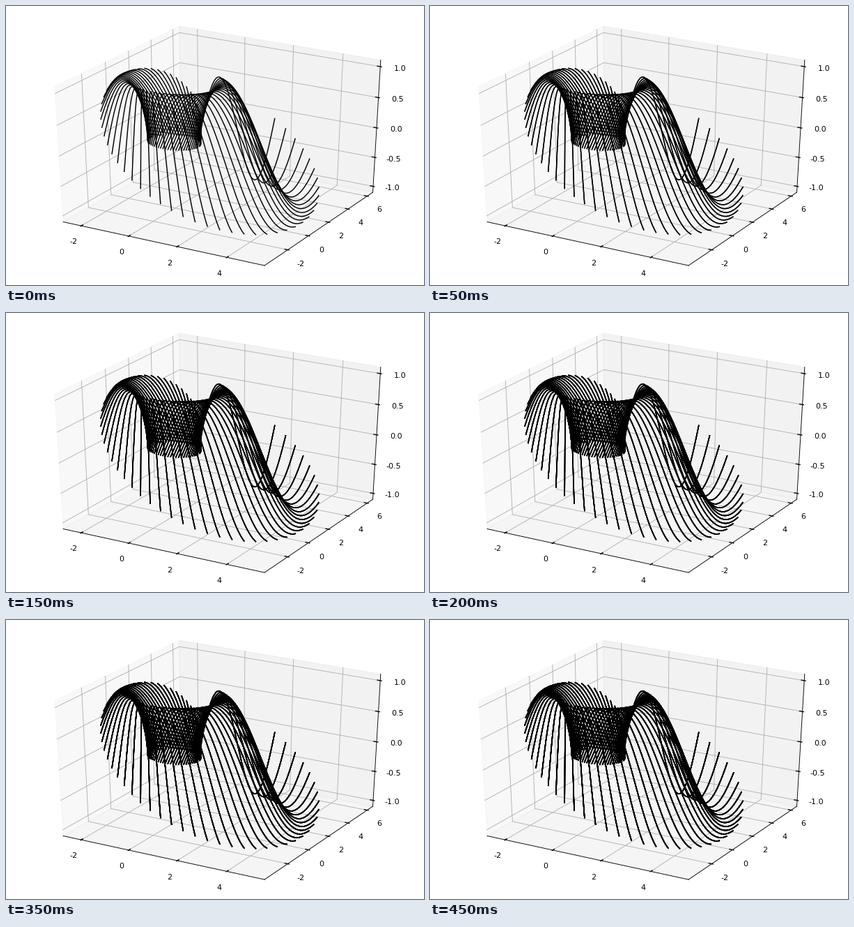
A matplotlib script for the animation above (550 ms loop, 600 by 400 pixels).

```python
import numpy as np
import matplotlib.pyplot as plt
from matplotlib.animation import FuncAnimation
from matplotlib.collections import LineCollection
from matplotlib.patches import Polygon

W, H, DPI = 600, 400, 80
FRAMES, INTERVAL = 11, 50
DIST = 10
EDGE = 0.5115       # half size of the box, in view units
FILL = 0.9265       # share of a unit cube taken by the data
LABEL_GAP = 0.064
TICK_OUT, TICK_IN = 0.0083, 0.0167
CENTER = np.array([307.8, 194.6])
ZOOM = np.array([3261, -2162])

elev, azim = np.radians(30), np.radians(-60)
TOWARD = np.array([np.cos(elev) * np.cos(azim),
                   np.cos(elev) * np.sin(azim),
                   np.sin(elev)])
RIGHT = np.array([-np.sin(azim), np.cos(azim), 0])
UP = np.cross(TOWARD, RIGHT)


def project(points):
    """Perspective view of box points, as stage pixels."""
    p = np.atleast_2d(points)
    flat = np.column_stack([p @ RIGHT, p @ UP])
    return CENTER + ZOOM * flat / (DIST - p @ TOWARD)[:, None]


def tangent(a, n=70):
    """Line along the tangent of the unit circle at angle a, lifted by a sine."""
    t = np.linspace(0, a, n)
    return np.column_stack([np.cos(a) - t * np.sin(a),
                            np.sin(a) + t * np.cos(a),
                            np.sin(t)])


lines = [tangent(a) for a in np.arange(63) * 0.1]
cloud = np.vstack(lines)
low, high = cloud.min(axis=0), cloud.max(axis=0)
mid, scale = (low + high) / 2, FILL / (high - low)
curves = [project((line - mid) * scale) for line in lines]

fig = plt.figure(figsize=(W / DPI, H / DPI), dpi=DPI, facecolor="white")
ax = fig.add_axes([0, 0, 1, 1])
ax.set_xlim(0, W)
ax.set_ylim(H, 0)
ax.axis("off")

E = EDGE


def stroke(points, **style):
    ax.plot(*project(points).T, **style)


def pane(corners, grey):
    tone = (grey, grey, grey, 0.5)
    ax.add_patch(Polygon(project(corners), facecolor=tone, edgecolor=tone,
                         linewidth=1, zorder=0))


pane([(-E, -E, -E), (-E, E, -E), (-E, E, E), (-E, -E, E)], 0.95)
pane([(-E, E, -E), (E, E, -E), (E, E, E), (-E, E, E)], 0.90)
pane([(-E, -E, -E), (E, -E, -E), (E, E, -E), (-E, E, -E)], 0.925)


def draw_axis(index, base, tick_dir, grid_path, ticks, fmt):
    """Axis line, grid, ticks and labels; base is the edge the axis runs on."""
    base = np.array(base, float)
    side = np.sign(base)
    ends = np.array([base, base])
    ends[:, index] = -E, E
    stroke(ends, color="black", lw=0.8, zorder=2)
    for value in ticks:
        at = (value - mid[index]) * scale[index]
        path = np.array(grid_path, float)
        path[:, index] = at
        stroke(path, color="#b0b0b0", lw=0.8, zorder=1)

        mark = np.array([base, base])
        mark[:, index] = at
        mark[:, tick_dir] += side[tick_dir] * np.array([TICK_OUT, -TICK_IN])
        stroke(mark, color="black", lw=1.2, zorder=3, solid_capstyle="butt")

        spot = base + side * LABEL_GAP
        spot[index] = at
        ax.text(*project(spot)[0], fmt % value, ha="center", va="top",
                family="DejaVu Sans", size=10, color="black")


draw_axis(0, (0, -E, -E), 1, [(0, -E, -E), (0, E, -E), (0, E, E)],
          range(-2, 5, 2), "%d")
draw_axis(1, (E, 0, -E), 0, [(E, 0, -E), (-E, 0, -E), (-E, 0, E)],
          range(-2, 7, 2), "%d")
draw_axis(2, (E, E, 0), 0, [(E, E, 0), (-E, E, 0), (-E, -E, 0)],
          np.arange(-1, 1.1, 0.5), "%.1f")

wire = LineCollection([], colors="black", linewidths=1.3, zorder=4)
ax.add_collection(wire, autolim=False)


def update(frame):
    # repainting the set hardens the soft edges; later on only every other step
    coats = 1 + min(frame, 5) + max(frame - 5, 0) // 2
    wire.set_segments(curves * coats)
    return [wire]


def reset():
    return update(0)


anim = FuncAnimation(fig, update, frames=FRAMES, init_func=reset,
                     interval=INTERVAL, repeat=True)
plt.show()
```
